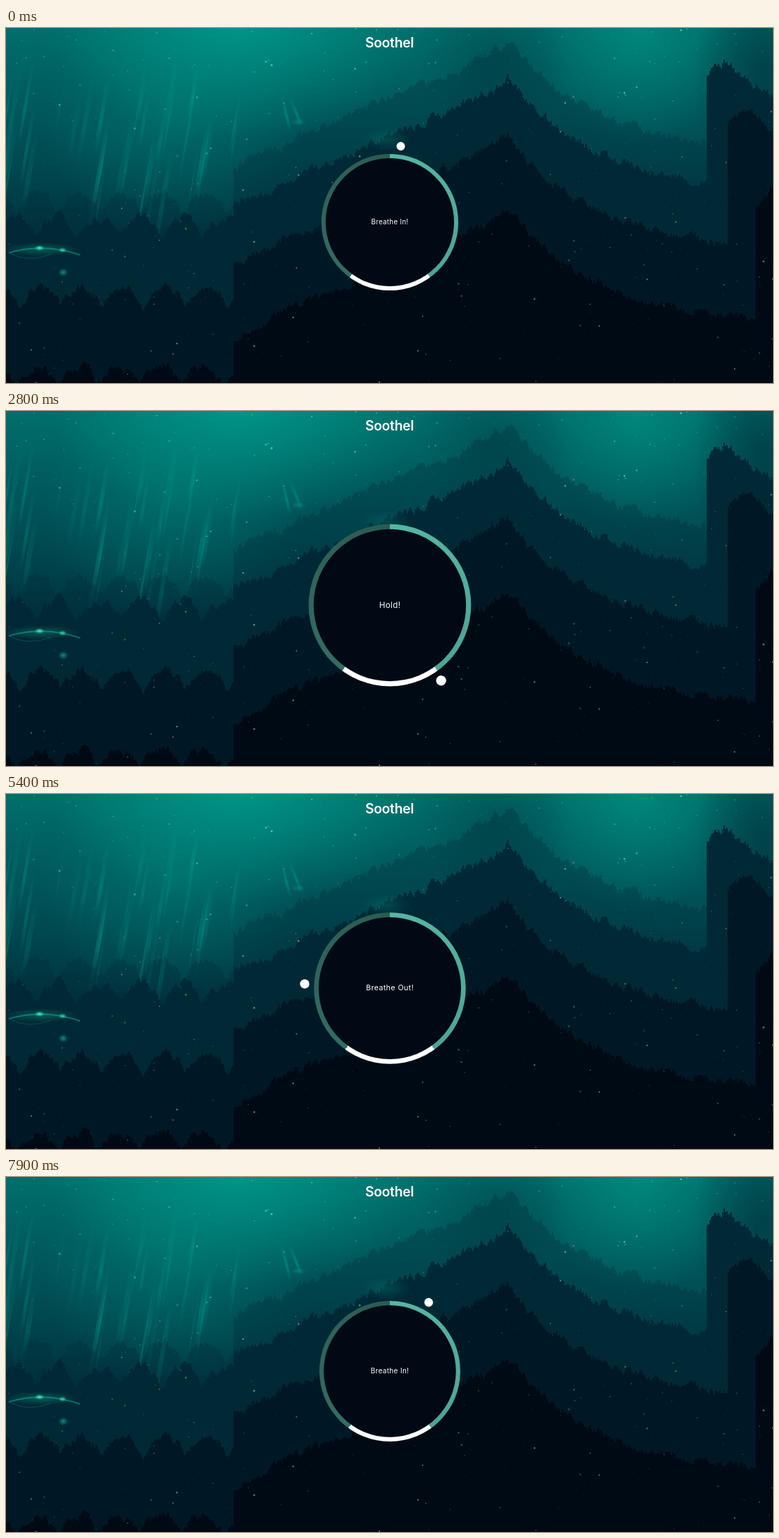
An HTML page with a canvas that plays this animation: 1099 px wide and 510 px high, repeating every 8000 ms.

```html
<!DOCTYPE html>
<html lang="en">
<head>
<meta charset="utf-8">
<title>Soothel</title>
<style>
  html, body { margin: 0; width: 100%; height: 100%; overflow: hidden; background: #000a14; }
  body { position: relative; color: #fff; font-family: Inter, "Open Sans", sans-serif; }
  canvas, svg { position: absolute; left: 0; top: 0; display: block; }
  h1 {
    position: absolute; left: 0; top: 9px; width: 1099px; margin: 0;
    font-size: 19.4px; line-height: 25px; font-weight: 600;
    letter-spacing: -.3px; text-align: center;
  }
  #app { position: absolute; left: 550.4px; top: 279.2px; width: 0; height: 0; }
  #app div { position: absolute; border-radius: 50%; }
  #app .ring {
    left: -97.15px; top: -97.15px; width: 194.3px; height: 194.3px;
    background: conic-gradient(#55b7a4 0%, #4ca493 40%, #fff 40%, #fff 60%, #336d62 60%, #2a5b52 100%);
  }
  #app .disc {
    left: -91.1px; top: -91.1px; width: 182.2px; height: 182.2px;
    background: #000914; text-align: center;
    font-size: 9.7px; line-height: 182.2px; letter-spacing: .3px;
  }
  #app #hand { left: 0; top: 0; width: 0; height: 0; }
  #app .dot { left: -6.1px; top: -115.4px; width: 12.2px; height: 12.2px; background: #fff; }
</style>
</head>
<body>
<canvas id="scene" width="1099" height="510"></canvas>
<h1>Soothel</h1>
<div id="app">
  <div class="ring"></div>
  <div class="disc" id="label">Breathe In!</div>
  <div id="hand"><div class="dot"></div></div>
</div>
<svg id="cursor" width="14" height="18" viewBox="-1 -1 14 18">
  <path d="M0 0V12L2.8 9.4 4.6 13.6 6.5 12.8 4.7 8.7H8.5Z" fill="#000" stroke="#fff" stroke-width=".9"/>
</svg>
<script>
const W = 1099, H = 510;
const $ = id => document.getElementById(id);

function seeded(seed) {
  return () => (seed = (seed * 16807) % 2147483647) / 2147483647;
}

function drawScene() {
  const c = $('scene').getContext('2d');
  const rand = seeded(4711);

  function glow(x, y, rx, ry, color, alpha) {
    c.save();
    c.translate(x, y);
    c.scale(rx, ry);
    const g = c.createRadialGradient(0, 0, 0, 0, 0, 1);
    g.addColorStop(0, `rgba(${color},${alpha})`);
    g.addColorStop(.5, `rgba(${color},${alpha * .5})`);
    g.addColorStop(1, `rgba(${color},0)`);
    c.fillStyle = g;
    c.fillRect(-1, -1, 2, 2);
    c.restore();
  }

  // Height of a mountain: flat forest on the left, a summit, a valley, a tall tree at the right edge
  function mountain(x, { peak, floor, edge, wall }) {
    const d = x - 717;
    let y = d > 0
      ? peak + 170 * (1 - Math.exp(-d / 130))
      : peak + 12 * (1 - Math.exp(d / 15)) - .44 * d;
    if (x < 325) y = floor - 28 * Math.abs(Math.sin(x / 19 + peak));
    if (x > edge) y = Math.min(y, wall + .7 * Math.abs(x - edge - 25));
    return y;
  }

  function ridge(layer) {
    let bump = 0;
    c.beginPath();
    c.moveTo(0, H);
    for (let x = 0; x < W; x += 2) {
      bump = bump * .72 + (rand() - .5) * 10;
      const y = mountain(x, layer) + bump;
      c.lineTo(x, y);
      c.lineTo(x + 2, y);
    }
    c.lineTo(W, H);
    c.fillStyle = layer.color;
    c.fill();
  }

  function streak(x, y, dx, dy, width, alpha) {
    const g = c.createLinearGradient(x, y, x + dx, y + dy);
    g.addColorStop(0, 'rgba(0,165,145,0)');
    g.addColorStop(.6, `rgba(0,165,145,${alpha})`);
    g.addColorStop(1, 'rgba(0,165,145,0)');
    c.strokeStyle = g;
    c.lineWidth = width;
    c.beginPath();
    c.moveTo(x, y);
    c.lineTo(x + dx, y + dy);
    c.stroke();
  }

  function arc(endX, endY, bend, width, color) {
    c.strokeStyle = color;
    c.lineWidth = width;
    c.beginPath();
    c.moveTo(4, 323);
    c.quadraticCurveTo(endX / 2, bend, endX, endY);
    c.stroke();
  }

  const sky = c.createLinearGradient(0, 0, 0, H);
  sky.addColorStop(0, '#006f6b');
  sky.addColorStop(.3, '#005157');
  sky.addColorStop(.6, '#00323d');
  c.fillStyle = sky;
  c.fillRect(0, 0, W, H);
  glow(330, -10, 270, 170, '0,172,152', .65);
  glow(240, 130, 190, 180, '0,140,128', .42);
  glow(905, 5, 140, 165, '0,155,138', .55);
  glow(700, 45, 110, 120, '0,45,58', .35);
  glow(1085, 60, 100, 190, '0,32,46', .5);

  // Leaning dim trunks and light between them
  for (let i = 0; i < 40; i++) {
    const x = rand() * 350, y = 20 + rand() * 160;
    const length = 70 + rand() * 110;
    streak(x, y, -length * .17, length, 2 + rand() * 5, .08 + rand() * .24);
  }

  ridge({ peak: 15, floor: 265, edge: W, wall: 0, color: 'rgba(0,42,54,.3)' });
  ridge({ peak: 70, floor: 300, edge: 1003, wall: 50, color: '#002935' });
  ridge({ peak: 153, floor: 398, edge: 1032, wall: 115, color: '#001825' });
  ridge({ peak: 257, floor: 512, edge: 1072, wall: 235, color: '#000a14' });

  // Green reflections
  arc(106, 326, 308, 2, 'rgba(12,156,134,.6)');
  arc(64, 325, 338, 1, 'rgba(12,140,122,.4)');
  glow(50, 318, 54, 10, '25,200,165', .3);
  glow(48, 316, 7, 4, '70,255,210', .9);
  glow(81, 319, 6, 4, '60,240,200', .8);
  glow(82, 351, 7, 6, '20,180,150', .7);
  streak(394, 95, 14, 55, 4, .4);
  streak(406, 98, 18, 44, 4, .4);
  glow(419, 135, 11, 5, '20,165,145', .4);
  glow(545, 160, 36, 16, '0,110,105', .45);

  // Drifting specks, denser and larger towards the top
  for (let i = 0; i < 900; i++) {
    const x = rand() * W, y = H * rand() ** 1.35, size = .5 + rand() ** 5 * 1.9;
    c.fillStyle = `rgba(140,232,212,${.18 + rand() * .5})`;
    c.fillRect(x, y, size, size);
  }
}

const LOOP = 8000, TURN = 7.5, INHALE = 3, EXHALE = 4.5;

function render(ms) {
  // The picture advances in steps of about 110 ms, shown on a 100 ms grid
  const tick = Math.floor(ms % LOOP / 100);
  const step = Math.floor((tick + 1.05) / 1.1);
  const s = (.17 + step * .1103) % TURN;

  let scale = 1.2, text = 'Hold!';
  if (s < INHALE) {
    scale = 1 + .2 * s / INHALE;
    text = 'Breathe In!';
  } else if (s >= EXHALE) {
    scale = 1.2 - .2 * (s - EXHALE) / (TURN - EXHALE);
    text = 'Breathe Out!';
  }
  $('app').style.transform = `scale(${scale})`;
  $('hand').style.transform = `rotate(${s / TURN * 360}deg)`;
  if ($('label').textContent !== text) $('label').textContent = text;

  // The mouse drifts in from the top left, rests and leaves again
  const away = Math.max(0, Math.abs(tick - 7.5) - 1.5) / 4;
  $('cursor').style.visibility = away <= 1 ? 'visible' : 'hidden';
  $('cursor').style.transform = `translate(${110 - 45 * away ** 2}px, ${38 - 34 * away ** 2}px)`;
}

drawScene();
const start = performance.now();
function frame() {
  render(performance.now() - start);
  requestAnimationFrame(frame);
}
frame();
</script>
</body>
</html>
```
